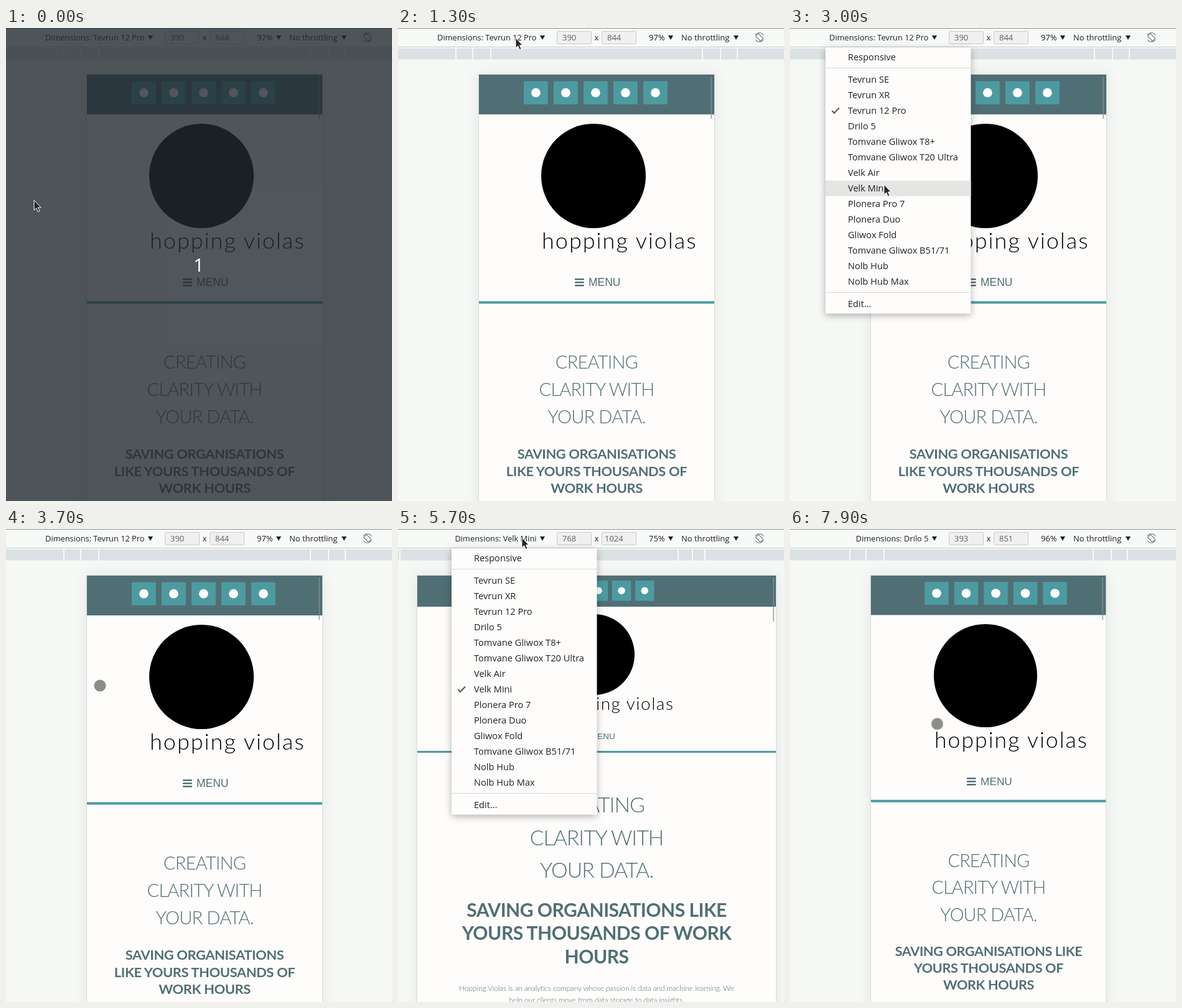
Write an HTML page that moves like this. It is 620x761 px and loops after 8000 ms.

```html
<!DOCTYPE html>
<html lang="en">
<head>
<meta charset="utf-8">
<title>Responsive preview</title>
<style>
  html, body { margin: 0; width: 100%; height: 100%; overflow: hidden; background: #f6f8f6; }
  svg { display: block; width: 620px; height: 761px; }

  .ui { font: 13px "Open Sans", "Noto Sans", sans-serif; fill: #1f2122; }
  .menu { font: 14.6px "Open Sans", "Noto Sans", sans-serif; fill: #1f2122; }
  .site { font-family: Lato, sans-serif; fill: #506f75; }
  .light { font-weight: 300; }
  .title { font-weight: 300; letter-spacing: -.029em; }
  .lead { font-weight: 700; letter-spacing: -.016em; }
  .note { font-weight: 300; letter-spacing: -.012em; }
  .nav { font-family: "Liberation Sans", Arial, sans-serif; }
  .mid { text-anchor: middle; }
  .end { text-anchor: end; }
  .sheet { filter: drop-shadow(0 0 11px rgba(0, 0, 0, .08)); }
  .panel { filter: drop-shadow(0 3px 6px rgba(0, 0, 0, .3)); }

  .anim { animation: 8s step-end infinite; }
  .phone { animation-name: phone; }
  .tablet { animation-name: tablet; }
  .small { animation-name: small; }
  .menu-a { animation-name: menu-a; }
  .menu-b { animation-name: menu-b; }
  .row-a { animation-name: row-a; }
  .row-b { animation-name: row-b; }
  .dim { animation-name: dim; }
  .pointer { animation-name: move; }
  .arrow { animation-name: arrow; }
  .touch { animation-name: touch; }

  @keyframes dim { 0% { opacity: 1 } 1.25%, 100% { opacity: 0 } }
  @keyframes phone { 0% { opacity: 1 } 47.5%, 100% { opacity: 0 } }
  @keyframes tablet { 0% { opacity: 0 } 47.5% { opacity: 1 } 93.75%, 100% { opacity: 0 } }
  @keyframes small { 0% { opacity: 0 } 93.75%, 100% { opacity: 1 } }
  @keyframes menu-a { 0% { opacity: 0 } 18.75% { opacity: 1 } 46.25%, 100% { opacity: 0 } }
  @keyframes menu-b { 0% { opacity: 0 } 71.25% { opacity: 1 } 92.5%, 100% { opacity: 0 } }

  @keyframes row-a {
    0% { opacity: 0; transform: translateY(0) }
    27.5% { opacity: 1; transform: translateY(0) }
    28.75% { opacity: 1; transform: translateY(61px) }
    30% { opacity: 1; transform: translateY(111px) }
    31.25% { opacity: 1; transform: translateY(161px) }
    32.5% { opacity: 1; transform: translateY(186px) }
    33.75%, 100% { opacity: 1; transform: translateY(211px) }
  }
  @keyframes row-b {
    0% { opacity: 0; transform: translateY(0) }
    76.25% { opacity: 1; transform: translateY(0) }
    77.5% { opacity: 0; transform: translateY(0) }
    80% { opacity: 1; transform: translateY(61px) }
    81.25% { opacity: 1; transform: translateY(86px) }
    82.5%, 100% { opacity: 1; transform: translateY(111px) }
  }
  @keyframes move {
    0% { transform: translate(45px, 277px) }
    6.25% { transform: translate(45px, 277px); animation-timing-function: steps(8) }
    16.25% { transform: translate(189px, 16px) }
    27.5% { transform: translate(188px, 15px) }
    28.75% { transform: translate(184px, 45px) }
    30% { transform: translate(176px, 105px) }
    31.25% { transform: translate(167px, 155px) }
    32.5% { transform: translate(158px, 205px) }
    33.75% { transform: translate(151px, 246px) }
    37.5% { transform: translate(151px, 252px) }
    56.25% { transform: translate(139.5px, 204px) }
    57.5% { transform: translate(139.5px, 204px); animation-timing-function: steps(5) }
    63.75% { transform: translate(199px, 14px) }
    76.25% { transform: translate(196px, 28px) }
    77.5% { transform: translate(188px, 64px) }
    80% { transform: translate(184px, 95px) }
    81.25% { transform: translate(180px, 125px) }
    82.5% { transform: translate(177px, 157px) }
    87.5% { transform: translate(176px, 157px) }
    92.5% { transform: translate(176px, 157px); animation-timing-function: steps(5) }
    98.75%, 100% { transform: translate(236.5px, 313.5px) }
  }
  /* The pointer turns into a touch dot while it is over the page. */
  @keyframes arrow {
    0% { opacity: 1 } 12.5% { opacity: 0 } 15% { opacity: 1 }
    46.25% { opacity: 0 } 62.5% { opacity: 1 } 92.5%, 100% { opacity: 0 }
  }
  @keyframes touch {
    0% { opacity: 0 } 12.5% { opacity: 1 } 15% { opacity: 0 }
    46.25% { opacity: 1 } 62.5% { opacity: 0 } 92.5%, 100% { opacity: 1 }
  }
</style>
</head>
<body>
<svg id="stage" viewBox="0 0 620 761" xmlns="http://www.w3.org/2000/svg"></svg>
<script>
  const TEAL = '#4c9ba1', SLATE = '#506f75', PAPER = '#fefdfc', INK = '#1f2122';

  const rect = (x, y, w, h, fill, extra = '') =>
    `<rect x="${x}" y="${y}" width="${w}" height="${h}" fill="${fill}" ${extra}/>`;
  const dot = (x, y, r, fill) => `<circle cx="${x}" cy="${y}" r="${r}" fill="${fill}"/>`;
  const text = (s, x, y, cls = '', style = '') =>
    `<text x="${x}" y="${y}" class="${cls}" style="${style}">${s}</text>`;
  const group = (cls, ...parts) => `<g class="${cls}">${parts.join('')}</g>`;
  const caret = x => `<path d="M${x - 4} 12h8l-4 7z" fill="${INK}"/>`;

  const views = [
    {
      name: 'phone', device: 'Tevrun 12 Pro', size: [390, 844], zoom: 97, sizeX: [264, 336],
      marks: [93, 120, 149, 489, 518, 545],
      x: 130, w: 378, head: 64, rule: [439.5, 4], bar: [502.3, 68],
      tile: { x: 202, y: 85.7, w: 38.8, h: 37, step: 48 },
      logo: [314, 238, 84], word: [231, 355, 36, 2],
      menu: [306, 415, 284],
      title: { size: 29.1, y: 548, step: 44 },
      lead: { size: 21.8, y: 693, step: 27.5,
        lines: ['SAVING ORGANISATIONS', 'LIKE YOURS THOUSANDS OF', 'WORK HOURS'] }
    },
    {
      name: 'tablet', device: 'Velk Mini', size: [768, 1024], zoom: 75, sizeX: [264, 332],
      marks: [3, 145, 165, 188, 450, 473, 493],
      x: 31, w: 576, head: 50, rule: [357, 3], bar: [602.3, 71],
      tile: { x: 232.5, y: 83, w: 30.5, h: 32.5, step: 37.1 },
      logo: [315, 202, 65], word: [250, 290.5, 28, 1.5],
      menu: [309, 338.2, 291.5],
      title: { size: 33.75, y: 456, step: 52.5 },
      lead: { size: 30, y: 623.5, step: 37.5,
        lines: ['SAVING ORGANISATIONS LIKE', 'YOURS THOUSANDS OF WORK', 'HOURS'] },
      note: ['Hopping Violas is an analytics company whose passion is data and machine learning. We',
        'help our clients move from data storage to data insights.']
    },
    {
      name: 'small', device: 'Drilo 5', size: [393, 851], zoom: 96, sizeX: [264, 336],
      marks: [96, 122, 151, 487, 516, 542],
      x: 130, w: 377.3, head: 63.4, rule: [435.7, 4], bar: [501.3, 68],
      tile: { x: 216.3, y: 85, w: 38.5, h: 37, step: 47.5 },
      logo: [314, 236, 83], word: [232, 352, 35.6, 2],
      menu: [306, 412, 284],
      title: { size: 28.8, y: 543.5, step: 43.5 },
      lead: { size: 21.6, y: 687, step: 27,
        lines: ['SAVING ORGANISATIONS LIKE', 'YOURS THOUSANDS OF', 'WORK HOURS'] }
    }
  ];

  function tiles({ x, y, w, h, step }) {
    return [0, 1, 2, 3, 4].map(i =>
      rect(x + i * step, y, w, h, TEAL, 'rx="1"') +
      dot(x + i * step + w / 2, y + h / 2, w * .19, '#fff')).join('');
  }

  function burger(x, base, k) {
    return [0, 1, 2].map(i =>
      rect(x, base - (12 - i * 5) * k, 14.8 * k, 2.4 * k, SLATE, 'rx=".6"')).join('');
  }

  function lines(list, y, step, size, cls) {
    return list.map((s, i) =>
      text(s, 319, y + i * step, cls + ' mid', `font-size:${size}px`)).join('');
  }

  function view(v) {
    const [wx, wy, ws, gap] = v.word, [mx, my, bx] = v.menu, k = v.zoom / 97;
    return group(`anim ${v.name}`,
      group('ui',
        text(`Dimensions: ${v.device}`, 222.5, 20, 'end', 'font-size:12.8px'),
        v.size.map((n, i) => text(n, v.sizeX[i], 20, '', 'fill:#5c5f61')).join(''),
        text(v.zoom + '%', 403, 20)),
      v.marks.map(x => rect(x - 1, 32, 2, 19, '#f8faf9')).join(''),
      group('site',
        group('sheet', rect(v.x, 75, v.w, 760, PAPER)),
        rect(v.x - .5, 74.5, v.w + 1, 760, 'none', 'stroke="#dadcdb"'),
        rect(v.x, 75, v.w, v.head, SLATE),
        tiles(v.tile),
        rect(v.bar[0], 78, 1.8, v.bar[1], '#868f93', 'opacity=".75"'),
        dot(...v.logo, '#000'),
        text('hopping violas', wx, wy, 'light', `fill:#000;font-size:${ws}px;letter-spacing:${gap}px`),
        burger(bx, my, k),
        text('MENU', mx, my, 'nav', `font-size:${.18 * v.zoom}px`),
        rect(v.x, v.rule[0], v.w, v.rule[1], TEAL),
        lines(['CREATING', 'CLARITY WITH', 'YOUR DATA.'], v.title.y, v.title.step, v.title.size, 'title'),
        lines(v.lead.lines, v.lead.y, v.lead.step, v.lead.size, 'lead'),
        v.note ? lines(v.note, 743, 18.7, 12, 'note') : ''));
  }

  const devices = ['Tevrun SE', 'Tevrun XR', 'Tevrun 12 Pro', 'Drilo 5', 'Tomvane Gliwox T8+',
    'Tomvane Gliwox T20 Ultra', 'Velk Air', 'Velk Mini', 'Plonera Pro 7', 'Plonera Duo',
    'Gliwox Fold', 'Tomvane Gliwox B51/71', 'Nolb Hub', 'Nolb Hub Max'];

  function menu(id, x, checked) {
    const y = 83 + 25 * devices.indexOf(checked);
    return group(`anim menu menu-${id}`,
      group('panel', rect(x, 31, 233.5, 428.5, PAPER, 'rx="1"')),
      rect(x, 34.5, 233.5, 25, '#e5e5e4', `class="anim row-${id}"`),
      rect(x, 64, 233.5, 1, '#d8d9d8'),
      rect(x, 425, 233.5, 1, '#d8d9d8'),
      text('Responsive', x + 36, 52),
      devices.map((s, i) => text(s, x + 36, 88 + 25 * i)).join(''),
      text('Edit…', x + 36, 449),
      `<path d="M${x + 10.5} ${y}l3.5 4 8-8.5" fill="none" stroke="#555" stroke-width="2"/>`);
  }

  const toolbar =
    rect(0, 0, 620, 30, '#f8faf8') +
    rect(0, 0, 620, 1, '#8d9294') +
    rect(0, 30, 620, 1, '#cbcecf') +
    rect(0, 31, 620, 2, '#f3f5f5') +
    rect(0, 33, 620, 17.5, '#dce1e4') +
    [255, 327].map(x => rect(x + .5, 5.5, 55, 20, '#f0f1ef', 'rx="1.5" stroke="#c9cbca"')).join('') +
    group('ui',
      text('x', 315.5, 20),
      text('No throttling', 455, 20)) +
    [232, 438, 543].map(caret).join('') +
    `<g fill="none" stroke="#65696b" transform="translate(580.5 15) rotate(-45)">
      <rect x="-3.2" y="-5.5" width="6.4" height="11" rx="1"/>
      <path d="M-2-7A7.3 7.3 0 0 1 7 2M2 7A7.3 7.3 0 0 1-7-2"/></g>`;

  document.getElementById('stage').innerHTML =
    rect(0, 0, 620, 761, '#f6f8f6') + toolbar + views.map(view).join('') +
    menu('a', 57, 'Tevrun 12 Pro') + menu('b', 86, 'Velk Mini') +
    group('anim dim',
      rect(0, 0, 620, 761, 'rgba(34,41,47,.79)'),
      text('1', 309.5, 392, 'ui mid', 'font-size:30px;fill:#fff')) +
    group('anim pointer',
      group('anim arrow', `<path d="M0 0V16.2L3.7 12.8 6.3 18.8 9 17.6 6.4 11.8H11.2Z"
        fill="#222527" stroke="#fff" stroke-width="1"/>`),
      group('anim touch', dot(0, 0, 9.5, '#8c8c8b')));
</script>
</body>
</html>
```
